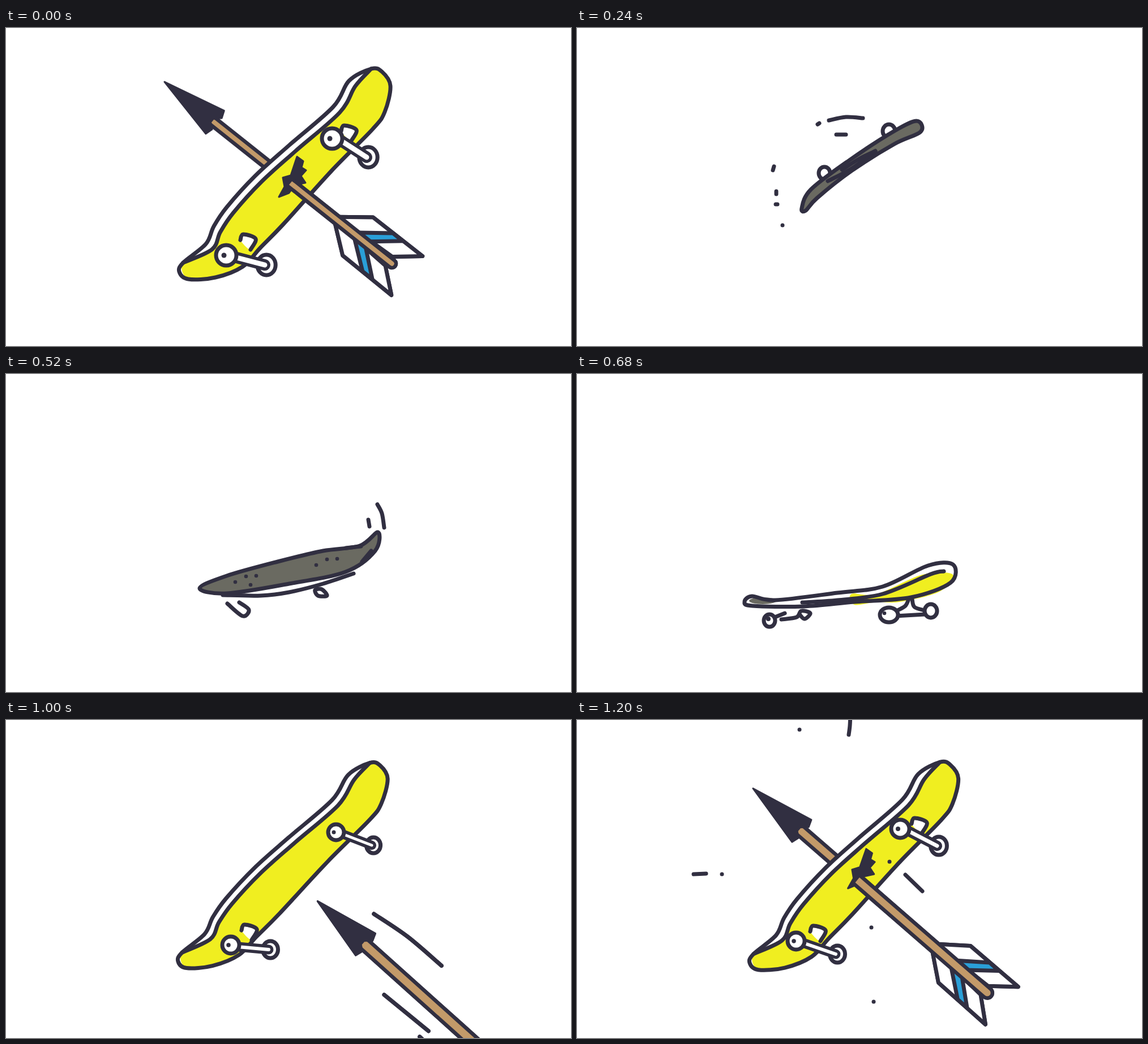
An HTML page for the animation above (1240 ms loop, 998 by 561 pixels).

```html
<!DOCTYPE html>
<html lang="en">
<head>
<meta charset="utf-8">
<title>Skateboard and arrow</title>
<style>
html, body { margin: 0; width: 100%; height: 100%; overflow: hidden; background: #fff; }
svg { display: block; width: 100%; height: 100%; }
svg * { vector-effect: non-scaling-stroke; stroke-linecap: round; stroke-linejoin: round; }
</style>
</head>
<body>
<svg id="stage" viewBox="0 0 998 561">
  <clipPath id="front"><path d="M887,-189L119,735L1100,1500L1900,600Z"/></clipPath>
  <g id="scene"></g>
</svg>
<script>
const INK = '#312f41', YELLOW = '#f0ee20', GREY = '#6a6a61', TAN = '#c39a69', BLUE = '#2a9fd8', WHITE = '#fff';
const LOOP = 1240, STEP = 40;

const lerp = (a, b, k) => a + (b - a) * k;
const clamp = k => Math.max(0, Math.min(1, k));

// ---- drawing helpers: points are strings of "x y x y ..." ----
function points(s) {
  const n = s.split(' ').map(Number);
  return n.filter((_, i) => i % 2 === 0).map((x, i) => [x, n[2 * i + 1]]);
}

// Catmull-Rom curve through all points
function smooth(p, closed) {
  const n = p.length;
  const get = i => closed ? p[(i + n) % n] : p[Math.max(0, Math.min(n - 1, i))];
  let d = 'M' + p[0];
  for (let i = 0; i < (closed ? n : n - 1); i++) {
    const [a, b, c, e] = [get(i - 1), get(i), get(i + 1), get(i + 2)];
    const out = b.map((v, k) => v + (c[k] - a[k]) / 6);
    const into = c.map((v, k) => v - (e[k] - b[k]) / 6);
    d += `C${out} ${into} ${c}`;
  }
  return d + (closed ? 'Z' : '');
}

const path = (d, fill, w, ink = INK) =>
  `<path d="${d}" fill="${fill}" stroke="${w ? ink : 'none'}" stroke-width="${w}"/>`;
const line = (s, w = 7, ink = INK) => path(smooth(points(s)), 'none', w, ink);
const lines = (...list) => list.map(s => line(s)).join('');
const shape = (s, fill, w = 7) => path(smooth(points(s), true), fill, w);
const poly = (s, fill, w = 7) => path('M' + points(s).join('L') + 'Z', fill, w);
const oval = (x, y, rx, ry = rx, fill = WHITE, w = 7) =>
  `<ellipse cx="${x}" cy="${y}" rx="${rx}" ry="${ry}" fill="${fill}" stroke="${INK}" stroke-width="${w}"/>`;
const dot = (x, y, r = 3.3) => oval(x, y, r, r, INK, 0);
const group = (move, art) => `<g transform="${move}">${art}</g>`;

// Move art from one placement [x, y, angle, length, width] to another
const fit = (to, from, art) => group(
  `translate(${to[0]} ${to[1]}) rotate(${to[2]}) scale(${to[3] / from[3]} ${to[4] / from[4]}) ` +
  `rotate(${-from[2]}) translate(${-from[0]} ${-from[1]})`, art);

// ---- underside of the board ----
const UNDER = [488, 258, -44, 496, 95];
const top_ = points('306 430 313 414 353 381 367 350 390 316 440 261 500 207 578 139 606 93 645 72');
const low = points('664 77 679 102 669 148 648 178 575 252 490 346 449 388 418 421 370 440 322 443');

function deck() {
  // the inner edge is the rail pushed in, closing up at both ends
  const rail = top_.slice(1), last = rail.length - 1;
  const inner = rail.map(([x, y], i) => {
    const k = Math.min(1, 2.5 * Math.sin(Math.PI * i / last));
    return [x + 11.5 * k, y + 10 * k];
  });
  const outline = smooth([...top_, ...low], true);
  return path(outline, WHITE, 0) + path(smooth([...inner, ...low], true), YELLOW, 0) +
    path(outline, 'none', 7) + path(smooth(inner), 'none', 7);
}

// near wheel, far wheel, wheel radius, offset of the base plate
function truck(x, y, fx, fy, r, base) {
  const plate = '16 -13 21 -23 43 -15 34 4';
  const axle = `${x + r * 0.8} ${y + 3} ${fx - 3} ${fy}`;
  return oval(fx, fy, r * 0.9, r) +
    (base ? group(`translate(${x + base[0]} ${y + base[1]})`, shape(plate, WHITE, 0) + line(plate)) : '') +
    line(axle, r + 2) + line(axle, r - 9, WHITE) + oval(x, y, r, r) + dot(x - 4, y, r / 4);
}

const hole = poly('514 227 525 235 522 246 530 251 521 261 529 273 510 277 500 291 482 298 492 280 489 264 503 260', INK, 3);

const pierced = deck() + hole + truck(576, 195, 640, 228, 18, [0, 0]) + truck(389, 401, 460, 418, 18, [9, -14]);

const TURNED = [485, 257, -43.5, 490, 88];
const turned = fit(TURNED, UNDER, deck()) + truck(583, 198, 649, 221, 14) + truck(397, 397, 467, 405, 15, [3, -13]);

const STRUCK = [485, 258, -44, 491, 91];
const struck = fit(STRUCK, UNDER, deck() + hole) +
  truck(571, 192, 639, 222, 16, [4, 4]) + truck(387, 390, 460, 413, 15, [9, -4]);

// ---- other views ----
const sideOn = oval(437, 256, 10, 11) + oval(551, 182, 11, 12) +
  shape('397 318 413 285 480 234 560 182 600 164 607 183 560 205 485 252 424 300 404 322', GREY) +
  lines('443 270 485 248 527 217', '468 250 500 230 527 217');
const sideOnMarks = lines('445 163 475 157 505 159', '425 170 428 168', '458 188 475 188',
  '348 244 346 251', '352 288 352 293', '351 311 354 311', '363 348 363 348');

const bolts = (x, y, n) => [[0, 0], [19, -10], [37, -11], [27, 5]].slice(0, n).map(p => dot(x + p[0], y + p[1])).join('');
const landed = shape('342 378 390 356 480 331 560 312 625 303 657 279 652 312 600 349 500 370 390 387', GREY) +
  lines('600 307 627 304', '629 331 645 312', '383 390 450 391 500 385 560 370 614 352',
    '391 405 418 427 429 416 412 403') +
  shape('546 381 551 391 567 391 558 380', WHITE) + bolts(405, 367, 4) + bolts(548, 337, 3);
const landedMarks = lines('656 230 664 246 668 271', '640 257 642 269');

const lowBody = '296 402 309 392 350 399 460 386 540 375 620 338 664 336 660 368 590 394 490 402 400 410 310 409';
const rolling = shape(lowBody, WHITE, 0) +
  shape('485 388 490 407 530 402 570 402 640 384 664 354 610 354 530 388', YELLOW, 0) +
  oval(328, 400, 24, 6, GREY, 0) + shape(lowBody, 'none') + line('398 403 460 399 540 388 625 353 648 348') +
  lines('566 417 580 409 586 397', '592 397 596 411 614 417', '562 427 615 424') +
  oval(551, 425, 16, 13) + dot(543, 422) + oval(625, 418, 11, 12) + oval(340, 435, 10, 11) + dot(338, 432, 4) +
  lines('352 428 367 422', '361 433 388 429 396 418 412 422 402 432 393 424');

const deckUp = oval(471, 180, 10, 6) + oval(594, 189, 13, 8) +
  shape('408 224 430 194 470 187 540 190 620 207 659 258 608 295 500 261 419 239', GREY) +
  shape('641 223 653 240 656 262 648 279 652 256', WHITE, 0) + lines('594 194 600 207 604 222', '610 206 615 217');
const deckUpMarks = lines('611 267 607 300 574 354', '635 277 636 300 621 329');

// ---- arrow: tip at the origin, shaft along x ----
function arrow(length, core, fast) {
  const feather = side => group(`translate(${length} 0) scale(1 ${side})`,
    poly('-127 -4 -77 -43 34 -44 -7 -10', WHITE) + poly('-79 -7 -32 -43 -10 -43 -56 -5', BLUE));
  const shaft = `112 1 ${length} 0`;
  return feather(1) + feather(-1) + line(shaft, core + 13) + line(shaft, core, TAN) +
    poly('0 0 114 -26 119 -13 108 -3 108 5 118 13 114 26', INK, 3) +
    (fast ? lines('89 -50 160 -60 239 -62', '198 44 299 39', '294 57 310 57') : '');
}

// ---- motion ----
// t: moment of the pose, from: first moment its drawing is used
const poses = [
  { t: 0, from: 0, at: UNDER, art: pierced },
  { t: 240, from: 120, at: [503, 245, -216, 256, 30], art: sideOn, marks: sideOnMarks },
  { t: 520, from: 380, at: [502, 335, -376, 332, 45], art: landed, marks: landedMarks },
  { t: 680, from: 600, at: [483, 378, -368, 377, 50], art: rolling },
  { t: 840, from: 760, at: [533, 238, -351.4, 252, 85], art: deckUp, marks: deckUpMarks },
  { t: 1000, from: 920, at: [485, 257, -403.5, 490, 88], art: turned },
  { t: 1200, from: 1040, at: [485, 258, -404, 491, 91], art: struck }
];

function boardAt(t) {
  const i = poses.findLastIndex(p => t >= p.t), a = poses[i], b = poses[i + 1] || a;
  const k = clamp((t - a.t) / (b.t - a.t || 1));
  const now = a.at.map((v, j) => lerp(v, b.at[j], k));
  const { at, art, marks, t: home } = poses.findLast(p => t >= p.from);
  if (b.t <= 1000) now[4] *= 1 - 0.4 * Math.sin(Math.PI * k); // edge-on midway through a flip
  return fit(now, at, art + (marks && t > home - 2 * STEP && t <= home ? marks : ''));
}

// The arrow flies in, slows down in the board, then shoots out through it
function arrowAt(t) {
  if (t >= 200 && t < 920) return '';
  const s = t < 200 ? -760 * (t / 200) ** 1.4 : 351 * ((LOOP - t) / 240) ** 1.21;
  const loose = clamp(s / 55);
  const art = arrow(lerp(514, 562, loose), lerp(8, 13, loose), t >= 920 && t < 1040);
  return group(`translate(${280 + 0.77 * s} ${95 + 0.64 * s}) rotate(${lerp(38.6, 42, loose)})`, art);
}

const burst = lines('483 -12 482 10 480 26', '206 272 228 271', '580 273 610 302', '393 17 393 17',
  '256 272 256 272', '552 250 552 250', '520 366 520 366', '524 497 524 497');

function burstAt(t) {
  const k = (t - 1040) / 160;
  return k > 0 ? group(`translate(505 272) scale(${k ** 0.8}) translate(-505 -272)`, burst) : '';
}

const scene = document.getElementById('scene');

function draw(t) {
  const shot = arrowAt(t);
  scene.innerHTML = shot + boardAt(t) + `<g clip-path="url(#front)">${shot}</g>` + burstAt(t);
}

const start = performance.now();
let shown = -1;
function tick() {
  const t = Math.floor((performance.now() - start) % LOOP / STEP) * STEP;
  if (t !== shown) draw(shown = t);
  requestAnimationFrame(tick);
}
tick();
</script>
</body>
</html>
```
